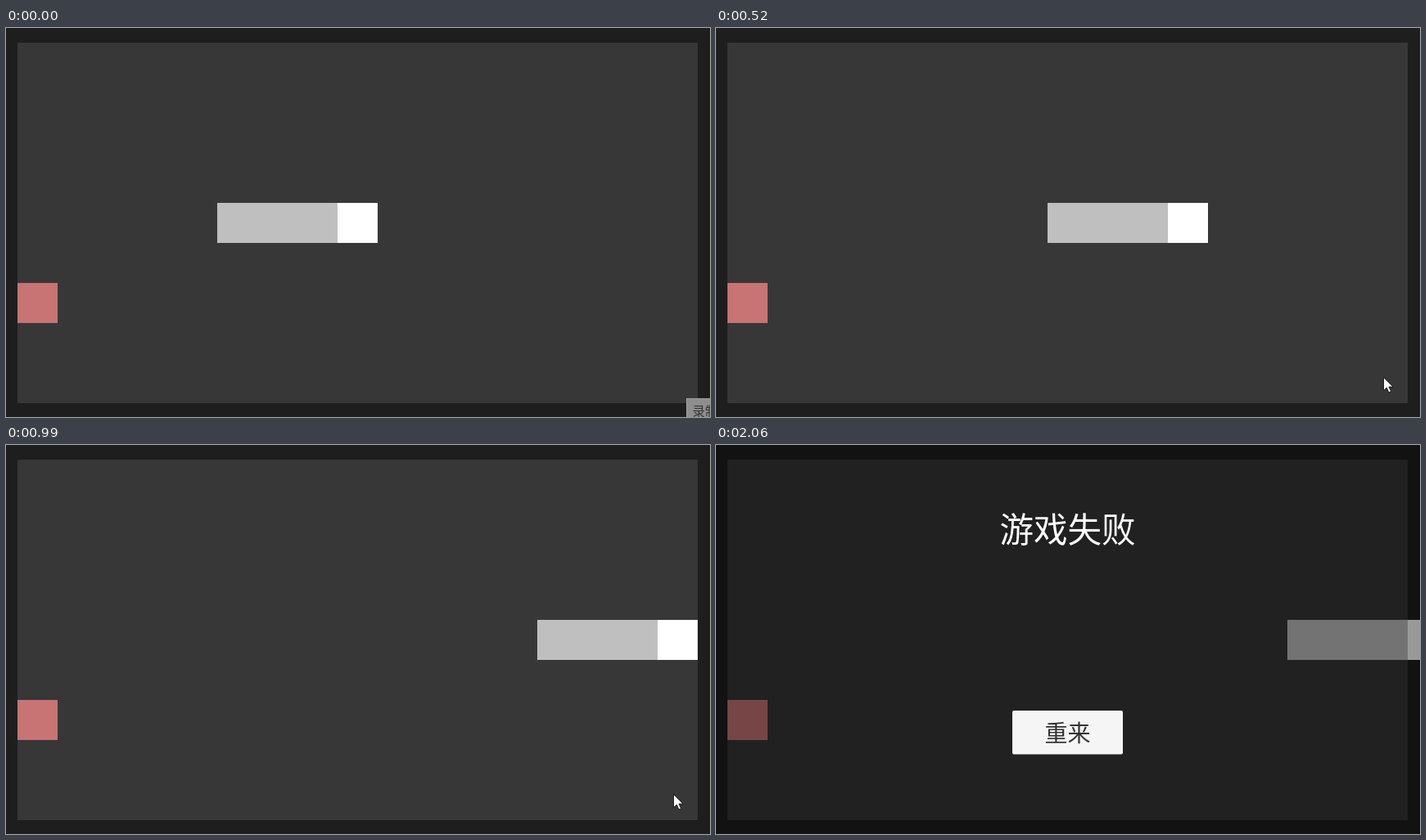
An HTML page that plays this animation: 860 px wide and 476 px high, repeating every 2.58 s.

```html
<!DOCTYPE html>
<html lang="zh-CN">
<head>
<meta charset="utf-8">
<style>
  html, body { margin: 0; width: 100%; height: 100%; overflow: hidden; background: #1e1e1e; }
  svg { display: block; width: 860px; height: 476px; font-family: "Noto Sans CJK SC", "Noto Sans CJK", sans-serif; }
</style>
</head>
<body>
<svg viewBox="0 0 860 476">
  <rect width="860" height="476" fill="#1e1e1e"/>
  <rect x="14" y="18" width="831" height="441" fill="#373737"/>
  <rect x="14" y="312" width="49" height="49" fill="#c87374"/>
  <g id="snake" shape-rendering="crispEdges">
    <rect id="tail" y="214" height="49" fill="#bfbfbf"/>
    <rect id="head" y="214" height="49" fill="#fff"/>
  </g>
  <g id="failure">
    <rect width="860" height="476" opacity=".4"/>
    <text x="429.5" y="118.5" font-size="41.5" text-anchor="middle" fill="#fff">游戏失败</text>
    <rect x="362" y="325" width="135" height="53.5" rx="2" fill="#f5f5f5"/>
    <text x="429.5" y="362.5" font-size="28" text-anchor="middle" fill="#323232">重来</text>
  </g>
  <g id="tooltip">
    <rect x="831.5" y="453.5" width="40" height="30" fill="#8e8e8e" stroke="#9c9c9c"/>
    <text x="838.5" y="475" font-size="15.5" fill="#333">录制</text>
  </g>
  <path id="cursor" d="M.5.5V16.7L4.3 13.1 6.9 19 9.6 17.8 7 12.1H12Z" fill="#fff" stroke="#111" stroke-width=".9"/>
  <circle id="click" cx="815" cy="427" r="15" fill="#f5f000" fill-opacity=".55"/>
</svg>
<script>
const LOOP = 2580, CELL = 831 / 17;
const moves = [330, 390, 520, 590, 720, 790, 920, 990, 1120];
// [time, x, y]: the pointer holds each place until the next
const pointer = [
  [0, 860, 480], [130, 829, 463], [200, 819, 441], [260, 815, 427],
  [1850, 815, 433], [1920, 816, 445], [1980, 817, 463], [2060, 817, 480]
];
const el = id => document.getElementById(id);
const show = (id, on) => el(id).style.display = on ? "" : "none";
const column = i => Math.round(14 + i * CELL);

function span(id, from, to) {
  el(id).setAttribute("x", column(from));
  el(id).setAttribute("width", column(to) - column(from));
}

function draw(t) {
  const step = moves.filter(m => m <= t).length;
  span("tail", 5 + step, 8 + step);
  span("head", 8 + step, 9 + step);
  show("tooltip", t < 70);
  show("click", t >= 330 && t < 520);
  show("failure", t >= 1120);
  const [, x, y] = pointer.findLast(p => p[0] <= t);
  el("cursor").setAttribute("transform", `translate(${x} ${y})`);
}

const start = performance.now();
function tick() {
  draw((performance.now() - start) % LOOP);
  requestAnimationFrame(tick);
}
tick();
</script>
</body>
</html>
```
